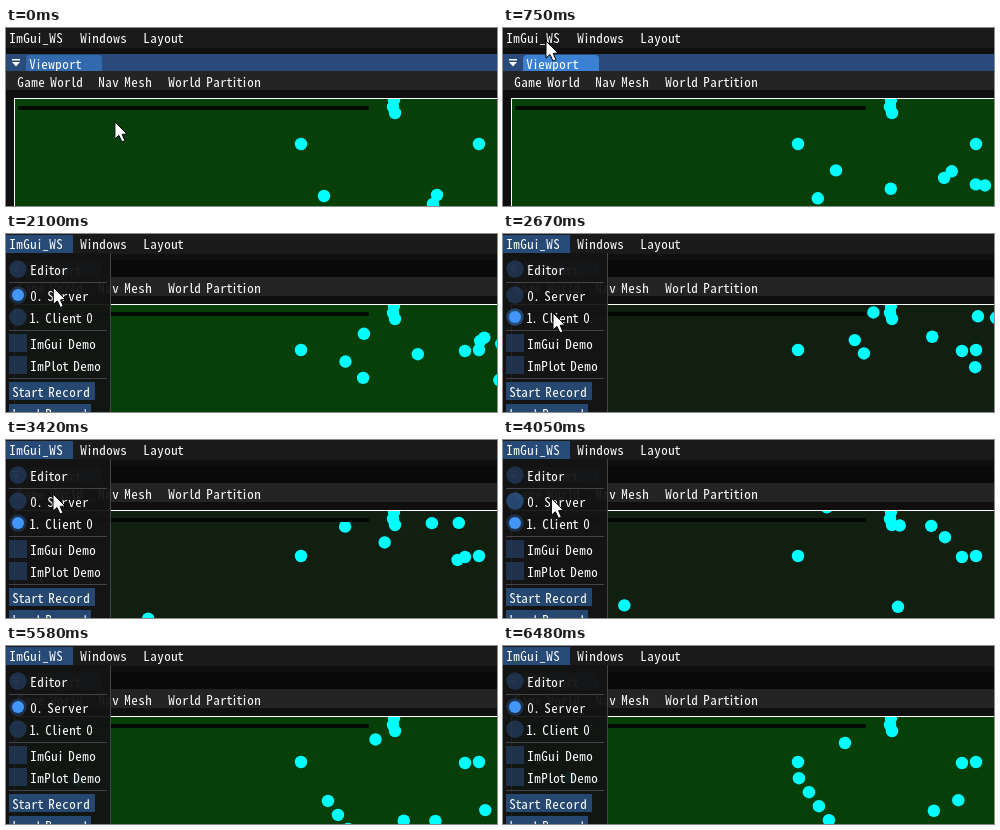
Write an HTML page with a canvas that moves like this. It is 491x178 px and loops after 6500 ms.

```html
<!DOCTYPE html>
<html lang="en">
<head>
<meta charset="utf-8">
<title>Viewport</title>
<style>
  html, body { margin: 0; width: 100%; height: 100%; overflow: hidden; background: #0f0f0f; }
  canvas { display: block; }
</style>
</head>
<body>
<canvas id="stage" width="491" height="178"></canvas>
<script>
const W = 491, H = 178, LOOP = 6500;
const STEP = 130;     // the world updates in steps of this many ms
const SPEED = 0.038;  // agent speed in px per ms
const FOCUS_LOST = 1170, MENU_OPEN = 1320, CLIENT_PICKED = 2670, SERVER_PICKED = 4200;
const ctx = document.getElementById('stage').getContext('2d');

// Where the mouse is at key times: time, x, y
const MOUSE = [
  [0, 109, 94], [750, 43, 13], [1440, 43, 13], [2520, 50, 79], [2670, 50, 79],
  [3060, 48, 35], [3420, 47, 54], [4320, 49, 60], [4470, 139, 83], [4700, 271, 200]
];

// Agents walk their route at constant speed and stop at its last corner.
const agents = [];
const addAgent = (start, ...route) => agents.push({ start, route });
for (const spot of [[388, 72], [387, 79], [389, 85], [295, 116], [473, 116]]) addAgent(0, spot);

// first crowd, heading up
addAgent(0, [318, 168], [390, 45]);
addAgent(0, [300, 196], [353, 104], [310, 50]);
addAgent(0, [345, 222], [361, 119], [440, 45]);
addAgent(0, [383, 190], [391, 141], [435, 97], [404, 50]);
addAgent(0, [431, 167], [505, 68]);
addAgent(0, [427, 176], [459, 117]);
addAgent(0, [472, 186], [475, 80], [342, 97]);
addAgent(0, [474, 186], [505, 75]);
// stragglers
addAgent(1320, [518, 161], [452, 121], [420, 45]);
addAgent(2670, [165, 193], [67, 131]);
addAgent(3420, [395, 190], [395, 150], [431, 176], [460, 150]);
// second crowd: a column to the left, two to the right
for (let i = 0; i < 4; i++) {
  const x = 354 + 10 * i, y = 183 + 14 * i;
  addAgent(4470, [x, y], [x - 120, y - 105]);
}
addAgent(4470, [357, 187], [440, 162]);
addAgent(4470, [450, 195], [504, 138]);

const mix = (a, b, k) => a + (b - a) * k;

function mouseAt(t) {
  const next = Math.max(1, MOUSE.findIndex(key => key[0] >= t));
  if (t > MOUSE.at(-1)[0]) return MOUSE.at(-1).slice(1);
  const [t0, x0, y0] = MOUSE[next - 1], [t1, x1, y1] = MOUSE[next];
  const k = Math.max(0, (t - t0) / (t1 - t0));
  return [mix(x0, x1, k), mix(y0, y1, k)];
}

function walk(route, distance) {
  for (let i = 1; i < route.length; i++) {
    const [x0, y0] = route[i - 1], [x1, y1] = route[i];
    const leg = Math.hypot(x1 - x0, y1 - y0);
    if (distance < leg) return [mix(x0, x1, distance / leg), mix(y0, y1, distance / leg)];
    distance -= leg;
  }
  return route.at(-1);
}

function rect(x, y, w, h, color, radius = 0) {
  ctx.fillStyle = color;
  ctx.beginPath();
  ctx.roundRect(x, y, w, h, radius);
  ctx.fill();
}

function disc(x, y, r, color) {
  ctx.fillStyle = color;
  ctx.beginPath();
  ctx.arc(x, y, r, 0, 7);
  ctx.fill();
}

function polygon(points, color) {
  ctx.fillStyle = color;
  ctx.beginPath();
  points.forEach(([x, y]) => ctx.lineTo(x, y));
  ctx.closePath();
  ctx.fill();
}

// Interface lettering: thin characters advance 5 px, the others 7 px.
function label(str, x, baseline) {
  ctx.font = '13px "Noto Sans Mono CJK JP", "Noto Sans Mono CJK SC", "Noto Sans CJK JP", monospace';
  ctx.textAlign = 'center';
  ctx.fillStyle = '#fff';
  for (const ch of str) {
    const advance = /[ilt.1 ]/.test(ch) ? 5 : 7;
    ctx.fillText(ch, x + advance / 2, baseline);
    x += advance;
  }
}

function drawWindow(focused, hoverX, hoverY) {
  const tabHover = focused && hoverX > 20 && hoverX < 96 && hoverY > 26 && hoverY < 43;
  rect(0, 0, W, H, '#0f0f0f');
  rect(0, 0, W, 20, '#1a1a1a');
  rect(0, 26, W, 17, focused ? '#294a7a' : '#0a0a0a');
  rect(20, 27, 76, 16, tabHover ? '#3b80d2' : focused ? '#3369ad' : '#23436c', [4, 4, 0, 0]);
  rect(6, 31, 8, 1.5, '#fff');
  polygon([[6, 34], [14, 34], [10, 38.5]], '#fff');
  label('Viewport', 23, 41);
  rect(0, 43, W, 19, '#242424');
  label('Game World', 11, 59);
  label('Nav Mesh', 92, 59);
  label('World Partition', 162, 59);
}

function drawScene(t, dark) {
  rect(8, 70, W, H, '#fff');
  rect(9, 71, W, H, dark ? '#101f10' : '#064008');
  ctx.save();
  ctx.beginPath();
  ctx.rect(9, 71, W, H);
  ctx.clip();
  for (const { start, route } of agents) {
    if (t >= start - STEP / 2) disc(...walk(route, Math.max(0, t - start) * SPEED), 6.2, '#0ff');
  }
  rect(12, 78, 351, 4, dark ? '#030603' : '#010c02', 1.5);
  ctx.restore();
}

function drawMainMenu(open, hoverY) {
  const hovered = hoverY < 20;
  if (open || hovered) rect(0, 1, 67, 18, hovered ? '#3d85e0' : '#284a76');
  label('ImGui_WS', 3, 15);
  label('Windows', 74, 15);
  label('Layout', 137, 15);
}

function drawPopup(picked, hoverX, hoverY) {
  const idle = 'rgba(41,74,122,.54)', hover = 'rgba(66,150,250,.4)';
  rect(0, 19, 105, H, 'rgba(20,20,20,.94)');
  rect(104, 19, 1, H, '#42424b');
  for (const y of [48, 96, 144]) rect(3, y, 98, 1, '#42424b');

  ['Editor', '0. Server', '1. Client 0'].forEach((name, i) => {
    const y = [35, 61, 83][i];
    const hovered = hoverX < 95 && hoverY >= y - 6 && hoverY <= y + 9;
    disc(12, y, 8.7, hovered ? hover : idle);
    if (i === picked) disc(12, y, 6, '#4296fa');
    label(name, 24, y + 6);
  });
  ['ImGui Demo', 'ImPlot Demo'].forEach((name, i) => {
    rect(3, 100 + 22 * i, 18, 18, idle);
    label(name, 24, 115 + 22 * i);
  });
  ['Start Record', 'Load Record'].forEach((name, i) => {
    rect(3, 148 + 22 * i, 86 - 4 * i, 18, '#264870');
    label(name, 6, 163 + 22 * i);
  });
}

function drawMouse(x, y) {
  const arrow = [[0, 0], [0, 17], [4, 13.5], [7, 20], [10, 18.8], [7.2, 12.5], [12, 12]];
  polygon(arrow.map(([dx, dy]) => [x + dx, y + dy]), '#fff');
  ctx.strokeStyle = '#000';
  ctx.lineWidth = 1;
  ctx.stroke();
}

function draw(time) {
  const stepped = Math.round(time / STEP) * STEP;
  const dark = time >= CLIENT_PICKED && time < SERVER_PICKED;
  const mouse = mouseAt(time);
  const hover = mouseAt(time - STEP);  // highlights trail the mouse by one step
  drawWindow(time < FOCUS_LOST, ...hover);
  drawScene(stepped, dark);
  drawMainMenu(time >= FOCUS_LOST, hover[1]);
  if (time >= MENU_OPEN) drawPopup(dark ? 2 : 1, ...hover);
  if (mouse[1] < H) drawMouse(...mouse);
}

const start = performance.now();
function tick() {
  draw((performance.now() - start) % LOOP);
  requestAnimationFrame(tick);
}
tick();
</script>
</body>
</html>
```
